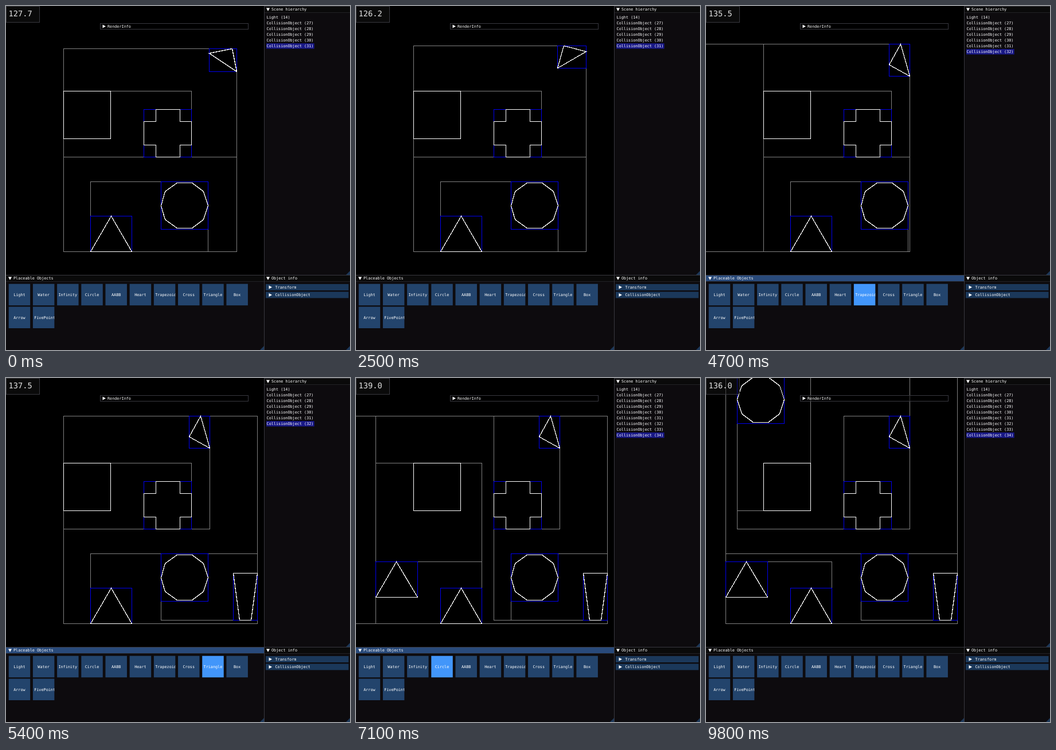
An HTML page for the animation above (10000 ms loop, 600 px wide and 600 px high).

```html
<!DOCTYPE html>
<html lang="en">
<head>
<meta charset="utf-8">
<title>Bounding volume hierarchy</title>
<style>
  html, body { margin: 0; width: 100%; height: 100%; overflow: hidden; background: #000; }
  svg { display: block; }
  #stage { width: 100vw; height: 100vh; }
  text {
    font: 6.813px "DejaVu Sans Mono", monospace;
    fill: #fff;
    white-space: pre;
    text-rendering: geometricPrecision;
  }
  #fps { font-size: 13.63px; fill: #e4e4e4; }
  .lines path { fill: none; shape-rendering: crispEdges; }
  #shapes { stroke-width: 1.25; }
</style>
</head>
<body>
<svg id="stage" viewBox="0 0 600 600">
  <rect width="600" height="600"/>
  <g class="lines">
    <path id="nodes" stroke="#808080"/>
    <path id="leaves" stroke="#0000f0"/>
    <path id="shapes" stroke="#fff"/>
  </g>
  <g id="ui"></g>
</svg>
<script>
const LOOP = 10000, STEP = 100, CHAR = 4.1016, ROW = 9.96;
const $ = id => document.getElementById(id);
const ui = $('ui');

function add(tag, attrs, parent = ui, text) {
  const el = document.createElementNS('http://www.w3.org/2000/svg', tag);
  for (const k in attrs) el.setAttribute(k, attrs[k]);
  if (text) el.textContent = text;
  parent.append(el);
  return el;
}
const box = (x, y, width, height, fill) => add('rect', { x, y, width, height, fill });
const label = (x, mid, text, parent) => add('text', { x, y: mid + 2.4 }, parent, text);
const arrow = (x, y, open) => add('path', {
  d: open ? `M${x} ${y - 2.5}h6l-3 5.5z` : `M${x} ${y - 3}v6l5.5-3z`, fill: '#fff'
});
const grip = (x, y) => add('path', { d: `M${x} ${y}v-7l-7 7z`, fill: '#1d3859' });

// ---- interface ----
const BORDER = '#38383f', PANEL = '#0d0b0e', TITLE = '#0a0a0a', BUTTON = '#23446c';

function panel(x, y, w, h, title) {
  box(x, y, w, h, PANEL);
  const bar = box(x, y, w, 11, TITLE);
  box(x, y, w, 1, BORDER);
  box(x, y + 11, w, 1, '#222226');
  arrow(x + 4, y + 6, true);
  label(x + 13, y + 6, title);
  grip(x + w, y + h);
  return bar;
}

function frame(x, y, w, h, fill) {
  add('rect', { x: x + .5, y: y + .5, width: w, height: h, fill, stroke: BORDER });
}

frame(0, 0, 58, 28, 'rgba(20,20,20,.5)');
const fps = add('text', { id: 'fps', x: 4.6, y: 18 });
frame(164, 30, 258, 10, 'rgba(0,0,0,.5)');
arrow(168.5, 35.5, false);
label(177, 35.7, 'RenderInfo');

const placeBar = panel(0, 469, 450, 131, 'Placeable Objects');
panel(450, 0, 150, 469, 'Scene hierarchy');
panel(450, 469, 150, 131, 'Object info');
box(450, 0, 1, 600, BORDER);

['Transform', 'CollisionObject'].forEach((name, i) => {
  const y = 485 + i * 13.4;
  box(453, y, 144.5, 11, '#1b385a');
  arrow(458.5, y + 5.5, false);
  label(469.5, y + 5.6, name);
});

const mark = box(454, 0, 83.7, ROW - .5, '#181886');
const rows = Array.from({ length: 9 }, (_, i) =>
  label(454.6, 20 + i * ROW, i ? `CollisionObject (${26 + i})` : 'Light (14)'));

const SIZE = 37.5, buttons = {};
['Light', 'Water', 'Infinity', 'Circle', 'AABB', 'Heart', 'Trapezoid', 'Cross',
 'Triangle', 'Box', 'Arrow', 'FivePoints'].forEach((name, i) => {
  const x = 4.7 + i % 10 * 42.19, y = 484.7 + Math.floor(i / 10) * 39.8;
  buttons[name] = { x: x + SIZE / 2, el: box(x, y, SIZE, SIZE, BUTTON) };
  const clip = add('svg', { x, y, width: SIZE, height: SIZE });
  label(Math.max(2.3, (SIZE - name.length * CHAR) / 2), SIZE / 2, name, clip);
});

// ---- shapes, centred on the origin ----
const R = 41.4;
const turn = ([x, y], a) =>
  [x * Math.cos(a) - y * Math.sin(a), x * Math.sin(a) + y * Math.cos(a)];
const ring = (n, pts, phase = 0) => Array.from({ length: n }, (_, i) =>
  pts.map(p => turn(p, phase + i * 2 * Math.PI / n))).flat();
const taper = (top, base, h) => [[-top, -h], [top, -h], [base, h], [-base, h]];

const square = taper(R, R, R);
const cross = ring(4, [[R / 2, -R], [R / 2, -R / 2], [R, -R / 2]]);
const triangle = taper(0, 36.2, 31);
const circle = ring(10, [[R, 0]]);
const trapezoid = taper(R / 2, R / 4, R);
const wedge = ring(4, [[29, 0]], -Math.PI / 2).slice(0, 3);

// ---- motion ----
function mix(keys, t) {
  const i = Math.max(1, keys.findIndex(k => k[0] > t));
  const end = t >= keys[keys.length - 1][0];
  const [a, b] = end ? keys.slice(-2) : [keys[i - 1], keys[i]];
  const u = end ? 1 : (t - a[0]) / (b[0] - a[0]);
  return { u, v: a.map((n, j) => n + (b[j] - n) * u) };
}

const still = (x, y) => () => [x, y, 0];

// time, x, y, degrees
const SPIN = [[0, 378.6, 98.4, -57], [2500, 376.8, 94.2, -120],
  [3300, 368.2, 94.2, -166], [3900, 347.6, 94.2, -196]];

// A new object waits out of view, then follows the pointer up from its button.
const WAIT = 300, AWAY = [-400, 250, 0], EDGE = 469;
const drag = (name, pts, from, time, x, y, lift) => ({
  name, pts, from,
  path(t) {
    const u = Math.min(1, (t - from - WAIT) / time), x0 = buttons[name].x;
    return u < 0 ? AWAY : [x0 + (x - x0) * u, EDGE + (y - EDGE) * u ** lift, 0];
  }
});

const objects = [
  { pts: square, path: still(141.5, 190) },
  { pts: cross, path: still(282.3, 221.7) },
  { pts: triangle, path: still(183.6, 397.6) },
  { pts: circle, path: still(311.4, 348.2) },
  { pts: wedge, path: t => mix(SPIN, t).v.slice(1) },
  drag('Trapezoid', trapezoid, 4600, 500, 417.4, 381.5, 1),
  drag('Triangle', triangle, 5700, 394, 70.9, 351.6, 2.06),
  drag('Circle', circle, 7100, 600, 95.5, 37.8, .43)
];
const FOCUS = [4600, 8900];

function place({ pts, path }, t) {
  const [x, y, deg] = path(t);
  const poly = pts.map(p => turn(p, deg * Math.PI / 180)).map(p => [p[0] + x, p[1] + y]);
  const xs = poly.map(p => p[0]), ys = poly.map(p => p[1]);
  const bounds = pts === circle ? [x - R, y - R, x + R, y + R]
    : [Math.min(...xs), Math.min(...ys), Math.max(...xs), Math.max(...ys)];
  return { poly, bounds };
}

// ---- hierarchy ----
const union = list => list.map(o => o.bounds).reduce((a, b) =>
  a.map((v, i) => i < 2 ? Math.min(v, b[i]) : Math.max(v, b[i])));

function cost(list) {
  const b = union(list);
  return list.length * (b[2] - b[0] + b[3] - b[1]);
}

// Split along the longer axis where the summed perimeter cost is lowest.
function build(list, out = []) {
  if (list.length < 2) return out;
  const b = union(list), axis = b[2] - b[0] > b[3] - b[1] ? 0 : 1;
  const mid = o => o.bounds[axis] + o.bounds[axis + 2];
  const sorted = [...list].sort((p, q) => mid(p) - mid(q));
  let best = Infinity, cut = 1;
  for (let k = 1; k < sorted.length; k++) {
    const c = cost(sorted.slice(0, k)) + cost(sorted.slice(k));
    if (c < best) { best = c; cut = k; }
  }
  out.push(b);
  build(sorted.slice(0, cut), out);
  return build(sorted.slice(cut), out);
}

// ---- drawing ----
const snap = v => Math.floor(v) + .5;
const trace = poly => 'M' + poly.map(p => p.map(snap).join(' ')).join('L') + 'Z';
const outline = ([l, t, r, b]) => trace([[l, t], [r, t], [r, b], [l, b]]);

const RATES = [[0, 127.7], [2500, 126.2], [3300, 127.5], [4700, 135.5],
  [6300, 139.6], [7900, 137.8], [9800, 136]];

function rate(t) {
  const { u, v } = mix(RATES, t);
  return v[1] + .5 * Math.sin(Math.PI * u) * Math.sin(t * 1.37);
}

function draw(t) {
  const live = objects.filter(o => !o.from || t >= o.from);
  const placed = live.map(o => place(o, t));
  $('nodes').setAttribute('d', build(placed).map(outline).join(''));
  $('leaves').setAttribute('d', placed.map(o => outline(o.bounds)).join(''));
  $('shapes').setAttribute('d', placed.map(o => trace(o.poly)).join(''));

  rows.forEach((row, i) => row.setAttribute('visibility', i <= live.length ? 'visible' : 'hidden'));
  mark.setAttribute('y', 15.3 + live.length * ROW);

  for (const { name, from } of objects.filter(o => o.name)) {
    const over = t >= from - WAIT && t < from + WAIT;
    buttons[name].el.setAttribute('fill', over ? '#4296fa' : BUTTON);
  }
  const focused = t >= FOCUS[0] && t < FOCUS[1];
  placeBar.setAttribute('fill', focused ? '#294a7a' : TITLE);
  fps.textContent = rate(t).toFixed(1);
}

const start = performance.now();
let shown = -1;
function tick() {
  const now = (performance.now() - start) % LOOP;
  const t = Math.min(Math.floor(now / STEP) * STEP, LOOP - 2 * STEP);
  if (t !== shown) draw(shown = t);
  requestAnimationFrame(tick);
}
tick();
</script>
</body>
</html>
```
